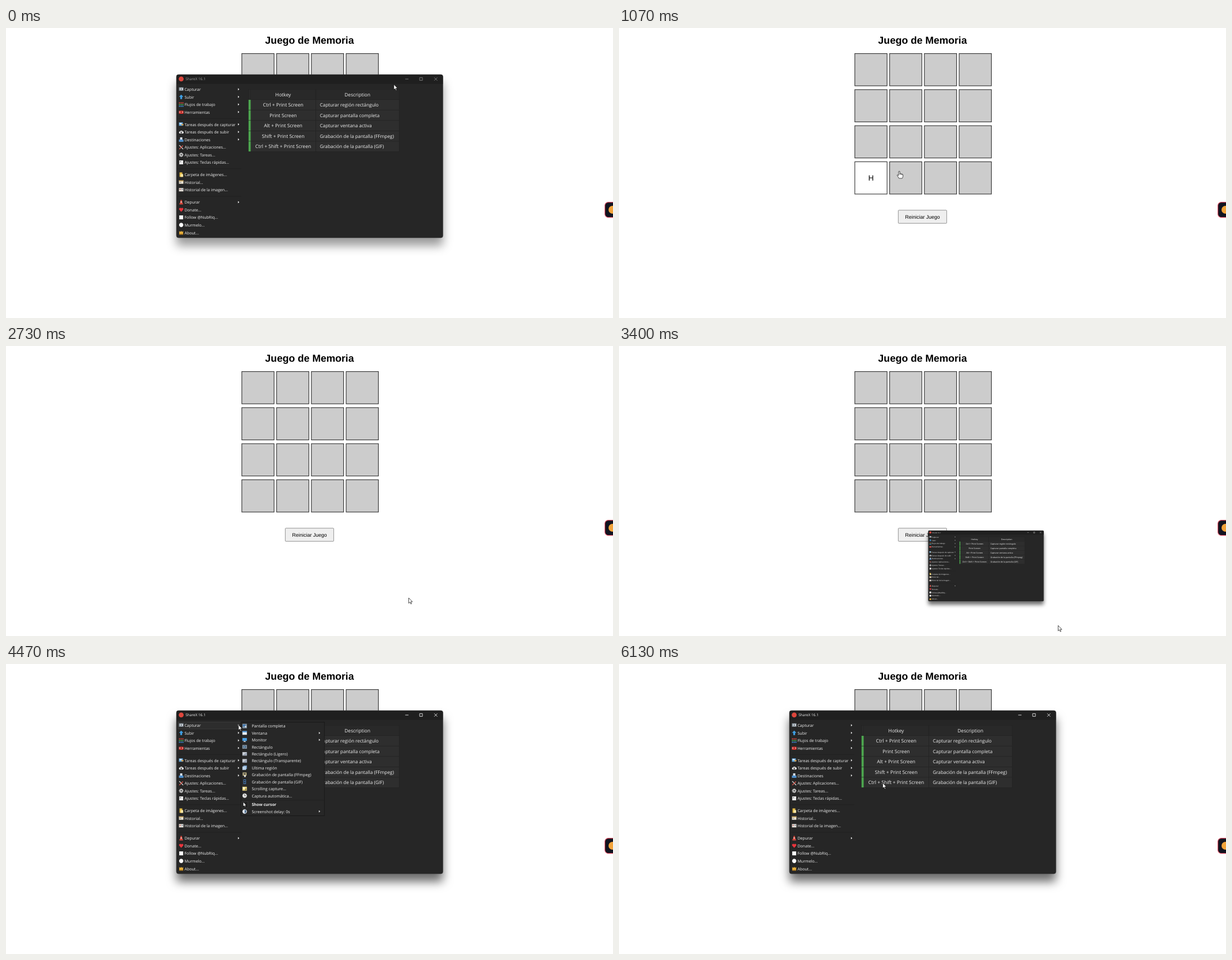
Write an HTML page that moves like this. It is 1083 by 517 pixels and loops after 6.2 s.

```html
<!DOCTYPE html>
<html lang="es">
<head>
<meta charset="utf-8">
<title>Juego de Memoria</title>
<style>
  html, body { margin: 0; width: 100%; height: 100%; overflow: hidden; background: #fff; }
  svg { display: block; width: 1083px; height: 517px; }
  text { font-family: "Open Sans", "Noto Sans", sans-serif; fill: #f0f0f0; text-rendering: geometricPrecision; }
  .page text { font-family: "Liberation Sans", Arial, sans-serif; fill: #000; text-anchor: middle; }
  .mid { text-anchor: middle; }
  .menu { font-size: 7.1px; }
  .sub { font-size: 7.2px; }
  .table { font-size: 8.35px; }
  .table .mid { font-size: 8.6px; }
  .bar text { font-size: 6.5px; }
  .bar path { fill: none; stroke: #fff; stroke-width: .8; }
  .idle .bar text { fill: #a0a0a0; }
  .idle .bar path { stroke: #8c8c8c; }
  .frame { filter: url(#deep); }
  .idle .frame { filter: url(#soft); }
</style>
</head>
<body>
<svg id="stage" viewBox="0 0 1083 517"></svg>
<script>
const FRAMES = 93, LOOP = 6200, STEP = LOOP / FRAMES;
const PX = 1083 / 1920;
const SIDE = 104 * PX, COL = 110 * PX, ROW = 114 * PX, LEFT = 420.2, TOP = 45;

const rect = (x, y, w, h, fill, more = '') =>
  `<rect x="${x}" y="${y}" width="${w}" height="${h}" fill="${fill}" ${more}/>`;
const label = (x, y, s, more = '') => `<text x="${x}" y="${y}" ${more}>${s}</text>`;
const path = (d, fill, more = '') => `<path d="${d}" fill="${fill}" ${more}/>`;
const caret = (x, y) => path(`M${x} ${y - 2}l2.3 2l-2.3 2z`, '#f0f0f0');

// Icons live in an 8 x 8 box: colour, path, colour, path ...
const dots = y => [0, 3, 6].map(x => `M${x} ${y}h2v2h-2z`).join('');
const ICONS = {
  camera: ['#8f9aa3', 'M0 .5h8v6h-8z', '#e4e8ec', 'M2 2h5v3h-5z', '#39434b', 'M3.2 2.7h2v1.6h-2z'],
  up: ['#3f9fe4', 'M4 0L8 4H5.6V8H2.4V4H0z'],
  flow: ['#e2483d', dots(0), '#4caf50', dots(3), '#3f8fe4', dots(6)],
  tools: ['#d8352f', 'M0 1.5h8v5.5h-8z', '#fff', 'M0 3.6h8v.8h-8z', '#8d1915', 'M3 3h2v2h-2z'],
  after: ['#5fa5dc', 'M0 .5h7v6h-7z', '#eef4fa', 'M1 1.6h4v2h-4z', '#f2a53a', 'M4.5 3.6h3.5v2h-3.5z'],
  cloud: ['#e3e3e3', 'M2 7a2 2 0 0 1 0-4a2.5 2.5 0 0 1 4.5 0a2 2 0 0 1 0 4z', '#3c3c3c', 'M4 3l1.7 2h-1v2h-1.4v-2h-1z'],
  drive: ['#5c9dd9', 'M0 4h8v4h-8z', '#dbe6f2', 'M2 0h4v4h-4z', '#2f6ba8', 'M1 5.6h6v1h-6z'],
  wrench: ['#cfcfcf', 'M1 0L8 7l-1 1L0 1z', '#d9564a', 'M0 7L6.5 .5l1 1L1 8z'],
  gear: ['#dcdcdc', 'M3.2 0h1.6v8h-1.6zM0 3.2h8v1.6h-8zM.7 1.8l1.1-1.1l5.5 5.5l-1.1 1.1zM6.2 .7l1.1 1.1l-5.5 5.5l-1.1-1.1z', '#272727', 'M4 2.8a1.2 1.2 0 1 0 .1 0z'],
  keys: ['#ececec', 'M.5 .5h7v7h-7z', '#777', 'M1.7 2h2v1.6h-2z'],
  folder: ['#dfb843', 'M1 0h5v8h-5z', '#f7e6a6', 'M3 3h4.5v5h-4.5z'],
  history: ['#e9e2d2', 'M0 .8h8v6h-8z', '#c59a45', 'M0 .8h8v1.4h-8z', '#777', 'M1 3.6h3v1h-3z'],
  images: ['#e6e1da', 'M0 .8h8v6h-8z', '#b9655c', 'M1 2.4h2.4v1.6h-2.4z', '#71859a', 'M4.6 2.4h2.4v1.6h-2.4z'],
  cone: ['#dc4a3e', 'M3 0h2l1.2 6h1v2h-6.4v-2h1z', '#f3d9d4', 'M2.6 3h2.8l.3 1.4h-3.4z'],
  heart: ['#e8343c', 'M4 7.6L.4 3.8A2.1 2.1 0 0 1 4 1.6A2.1 2.1 0 0 1 7.6 3.8z'],
  square: ['#fff', 'M.5 .5h7v7h-7z'],
  disc: ['#fff', 'M4 .2a3.8 3.8 0 1 0 .1 0z'],
  crown: ['#e9b23c', 'M.5 7.5V1l1.8 2L4 .8L5.7 3L7.5 1v6.5z', '#b67d1c', 'M.5 6h7v1.5h-7z'],
  screen: ['#7f93a5', 'M0 0h8v8h-8z', '#3b76b4', 'M1 1.4h4v3h-4z', '#dce6ee', 'M4.6 4h2.4v2.4h-2.4z'],
  window: ['#e9eef3', 'M0 .6h8v6.6h-8z', '#3f8fd8', 'M0 .6h8v2h-8z'],
  monitor: ['#4aa0e4', 'M0 .5h8v5.2h-8z', '#c4ccd4', 'M3 5.7h2v1h1.2v.9h-4.4v-.9h1.2z'],
  region: ['#8ea0b0', 'M0 .6h8v6.6h-8z', '#31465a', 'M1.6 2h4.8v3.8h-4.8z', '#7fb5e4', 'M2.4 3h3v1.8h-3z'],
  light: ['#c9ced6', 'M0 .8h8v6.2h-8z', '#9aa3b3', 'M0 7l8-6.2v6.2z'],
  layers: ['#7aa4cf', 'M1.8 0h6.2v6.2h-6.2z', '#b8d0e8', 'M0 1.6h6.4v6.2h-6.4z'],
  film: ['#cfc08a', 'M.6 0h6.8v5.5h-6.8z', '#4c4c4c', 'M2 1.2h4v2.6h-4z', '#e5e5e5', 'M3 5h3v3h-3z'],
  gif: ['#4d86c8', 'M1.8 0h4.6v8h-4.6z', '#222', 'M2.6 1h3v2.3h-3zM2.6 4.6h3v2.3h-3z'],
  scroll: ['#e8d27c', 'M0 .5h8v7h-8z', '#fbf6de', 'M1.2 1.6h3v3h-3z', '#7f7340', 'M5 4h2v2.6h-2z'],
  clock: ['#e2e2e2', 'M4 0a4 4 0 1 0 .1 0z', '#444', 'M3.6 1.4h.8v2.4h2v.8h-2.8z'],
  pointer: ['#fff', 'M1.8 .3v6.4l1.6-1.3l1 2.2l.9-.4l-1-2.1h2z'],
  delay: ['#dfe6ee', 'M4 0a4 4 0 1 0 .1 0z', '#4a6a8c', 'M4 1.2a2.8 2.8 0 0 1 0 5.6v-2.8z']
};
function icon(name, x, y) {
  const parts = ICONS[name];
  let out = '';
  for (let i = 0; i < parts.length; i += 2) out += path(parts[i + 1], parts[i]);
  return `<g transform="translate(${x - 4} ${y - 4})">${out}</g>`;
}

// Groups of [icon, text, has submenu]
const MENU = [
  [109.5, ['camera', 'Capturar', 1], ['up', 'Subir', 1], ['flow', 'Flujos de trabajo', 1], ['tools', 'Herramientas', 1]],
  [172, ['after', 'Tareas después de capturar', 1], ['cloud', 'Tareas después de subir', 1], ['drive', 'Destinaciones', 1],
    ['wrench', 'Ajustes: Aplicaciones...'], ['gear', 'Ajustes: Tareas...'], ['keys', 'Ajustes: Teclas rápidas...']],
  [261.6, ['folder', 'Carpeta de imágenes...'], ['history', 'Historial...'], ['images', 'Historial de la imagen...']],
  [310.7, ['cone', 'Depurar', 1], ['heart', 'Donate...'], ['square', 'Follow @NubRiq...'], ['disc', 'Murmelo...'], ['crown', 'About...']]
];
const SUBMENU = [
  [110.8, ['screen', 'Pantalla completa'], ['window', 'Ventana', 1], ['monitor', 'Monitor', 1], ['region', 'Rectángulo'],
    ['light', 'Rectángulo (Ligero)'], ['light', 'Rectángulo (Transparente)'], ['layers', 'Ultima región'],
    ['film', 'Grabación de pantalla (FFmpeg)'], ['gif', 'Grabación de pantalla (GIF)'], ['scroll', 'Scrolling capture...'],
    ['clock', 'Captura automática...']],
  [250.7, ['pointer', 'Show cursor'], ['delay', 'Screenshot delay: 0s', 1]]
];
const HOTKEYS = [
  ['Ctrl + Print Screen', 'Capturar región rectángulo'],
  ['Print Screen', 'Capturar pantalla completa'],
  ['Alt + Print Screen', 'Capturar ventana activa'],
  ['Shift + Print Screen', 'Grabación de la pantalla (FFmpeg)'],
  ['Ctrl + Shift + Print Screen', 'Grabación de la pantalla (GIF)']
];

function list(groups, pitch, iconX, textX, caretX) {
  return groups.map(([y0, ...items]) => items.map(([name, text, more], i) => {
    const y = y0 + i * pitch;
    const bold = name === 'pointer';
    return (bold ? rect(iconX - 5, y - 5.5, 10.5, 11, '#202020', 'stroke="#444" stroke-width=".5"') : '') +
      icon(name, iconX, y - .2) +
      label(textX, y + 2.6, text, bold ? 'font-weight="700"' : '') +
      (more ? caret(caretX, y - .3) : '');
  }).join('')).join('');
}

function page() {
  let out = label(541.5, 28, 'Juego de Memoria', `font-size="${32 * PX}" font-weight="700"`);
  for (let i = 0; i < 16; i++) {
    const x = LEFT + i % 4 * COL, y = TOP + (i >> 2) * ROW;
    out += rect(x + PX, y + PX, SIDE - 2 * PX, SIDE - 2 * PX, '#ccc', `id="card${i}" stroke="#333" stroke-width="${2 * PX}"`);
  }
  const letter = (id, s, c, r) => label(LEFT + c * COL + SIDE / 2, TOP + r * ROW + SIDE / 2 + 4.6, s, `id="${id}" font-size="${24 * PX}"`);
  return out + letter('letterF', 'F', 2, 2) + letter('letterH', 'H', 0, 3) +
    rect(498.3, 324.8, 86.4, 23.4, '#efefef', 'rx="1" stroke="#767676" stroke-width=".8"') +
    label(541.5, 339.6, 'Reiniciar Juego', `font-size="${16 * PX}"`) +
    rect(1068.6, 310.6, 30, 27, '#11131f', 'rx="6" stroke="#d8485c" stroke-width="1.2"') +
    '<circle cx="1082" cy="324" r="7" fill="#f2a33a"/>';
}

function table() {
  let out = rect(432.4, 109, 269.4, 111.6, '#212121') +
    rect(437, 109.5, 115.4, 18, '#292929') + rect(553.2, 109.5, 148.2, 18, '#292929') + rect(432.7, 109.5, 4, 18, '#292929') +
    label(494.5, 121.8, 'Hotkey', 'class="mid"') + label(627, 121.8, 'Description', 'class="mid"');
  HOTKEYS.forEach(([keys, text], i) => {
    const y = 128 + i * 18.55;
    out += rect(432.7, y, 3.9, 17.9, '#4ea64f') + rect(437, y, 115.4, 17.9, '#2e2e2e') + rect(553.2, y, 148.2, 17.9, '#2e2e2e') +
      label(494.5, y + 12.2, keys, 'class="mid"') + label(560, y + 12.2, text);
  });
  return `<g class="table">${out}</g>`;
}

function appWindow() {
  const rule = y => rect(307, y, 113, .8, '#1e1e1e');
  return rect(304, 83, 475.6, 291, '#272727', 'rx="4" class="frame"') +
    path('M304 99.8V87a4 4 0 0 1 4-4H775.6a4 4 0 0 1 4 4V99.8z', '#1f1f1f') +
    rect(304, 83, 475.6, 291, 'none', 'rx="4" stroke="#3a3a3a" stroke-width=".6"') +
    '<g class="bar"><circle cx="312.6" cy="90.8" r="4.4" fill="#dc463c"/>' + label(320.3, 93.3, 'ShareX 16.1') +
    '<path d="M712.3 91h5.8M738 88.4h5v5h-5zM764 88.2l5.6 5.6M769.6 88.2l-5.6 5.6"/></g>' +
    rect(307, 103.5, 113.6, 12.4, '#2d2d2d', 'id="hover" stroke="#454545" stroke-width=".6"') +
    [160.8, 250.5, 299.6].map(rule).join('') +
    `<g class="menu">${list(MENU, 13.55, 312.6, 318.4, 413.9)}</g>` + table() +
    '<g id="sub" class="sub">' + rect(419.3, 103.7, 148.8, 166.8, '#272727', 'stroke="#171717" stroke-width=".9"') +
    rect(421, 242.5, 146, .8, '#1e1e1e') + list(SUBMENU, 12.41, 425.8, 438.4, 558.3) + '</g>';
}

const shadow = (id, alpha) =>
  `<filter id="${id}" x="-10%" y="-10%" width="120%" height="130%"><feDropShadow dx="0" dy="14" stdDeviation="8.5" flood-color="#000" flood-opacity="${alpha}"/></filter>`;
const ink = 'stroke="#000" stroke-width=".7" stroke-linejoin="round"';

document.getElementById('stage').innerHTML =
  `<defs>${shadow('deep', .58)}${shadow('soft', .4)}</defs>` +
  `<g class="page">${page()}</g><g id="app">${appWindow()}</g><g id="cursor">` +
  path('M0 0V9.6L2.2 7.6L3.8 11L5.2 10.4L3.7 7H6.7z', '#fff', `id="arrow" ${ink}`) +
  '<g id="hand">' +
  path('M-1.1 .9Q0-.7 1.1 .9V4.6Q2.4 4 3.2 5Q4.4 4.5 5 5.6Q6.5 5.3 6.6 7V9.5Q6.4 11.5 5.3 13H-.6Q-1.5 11-3.6 8Q-4 6.6-2.6 6.8L-1.1 8.2z', '#fff', ink) +
  path('M1.1 4.6V6.6M3.2 5V6.8M5 5.6V7', 'none', ink) + '</g></g>';

const $ = id => document.getElementById(id);

// [step, x, y]
const TRACK = [
  [0, 692, 100.5], [1, 674, 110], [2, 632, 130], [3, 591.5, 147.3], [5, 581, 172], [9, 578.5, 201.5], [10, 578.5, 201.5],
  [11, 565, 212], [12, 520, 240], [13, 470, 262], [14, 452, 268], [15, 452, 268], [16, 500, 255], [17, 553, 248], [18, 553, 248],
  [19, 558, 240], [21, 574, 212], [22, 576, 208], [24, 574, 215], [26, 558, 240], [28, 549, 254], [29, 546, 256.5], [34, 546, 256.5],
  [36, 558, 275], [38, 605, 330], [40, 680, 410], [42, 757, 488], [43, 790, 545], [50, 800, 545],
  [51, 783.5, 498.3], [53, 647, 408], [55, 500, 270], [57, 430, 175], [60, 411, 129], [64, 414.8, 108.5], [69, 414.8, 108.5],
  [70, 422, 112], [72, 462, 130], [74, 510, 165], [76, 534, 200], [78, 500, 216], [79, 468, 211], [80, 466, 210],
  [83, 426, 219], [85, 445, 216], [87, 470.5, 212], [93, 470.5, 212]
];
// [step, scale, opacity]
const ZOOM = [[0, 1, 1], [1, .9, 1], [2, .5, .6], [3, .4, 0], [50, .4, 0], [51, .433, 1], [52, .88, 1], [53, .993, 1], [54, 1, 1], [93, 1, 1]];

function at(keys, k) {
  const i = Math.max(1, keys.findIndex(p => p[0] >= k));
  const a = keys[i - 1], b = keys[i], u = (k - a[0]) / (b[0] - a[0]);
  return [1, 2].map(j => a[j] + (b[j] - a[j]) * u);
}

const show = (id, on) => $(id).setAttribute('visibility', on ? 'visible' : 'hidden');

function flip(card, letter, on) {
  $(card).setAttribute('fill', on ? '#fff' : '#ccc');
  show(letter, on);
}

function overCard(x, y) {
  const u = x - LEFT, v = y - TOP;
  return u >= 0 && v >= 0 && u < 4 * COL && v < 4 * ROW && u % COL < SIDE && v % ROW < SIDE;
}

function draw(k) {
  const [x, y] = at(TRACK, k), [scale, alpha] = at(ZOOM, k);
  const app = $('app');
  app.setAttribute('transform', `translate(741 517) scale(${scale}) translate(-741 -517)`);
  app.setAttribute('opacity', alpha);
  app.setAttribute('display', alpha ? 'inline' : 'none');
  app.setAttribute('class', k < 51 ? 'idle' : '');

  flip('card10', 'letterF', k >= 21 && k < 36);
  flip('card12', 'letterH', k >= 15 && k < 36);

  const open = k >= 67 && k < 92;
  const row = open ? 0 : Math.floor((y - 103) / 13.55);
  const hover = open || (k > 53 && x > 307 && x < 421 && row >= 0 && row < 4);
  $('hover').setAttribute('y', 103.5 + row * 13.55);
  $('hover').setAttribute('display', hover ? 'inline' : 'none');
  $('sub').setAttribute('display', open ? 'inline' : 'none');

  const hand = k > 1 && k < 51 && overCard(x, y);
  show('hand', hand);
  show('arrow', !hand);
  $('cursor').setAttribute('transform', `translate(${x} ${y})`);
}

let last = -1;
function tick() {
  const k = Math.floor((performance.now() % LOOP + 3.4) / STEP) % FRAMES;
  if (k !== last) draw(last = k);
  requestAnimationFrame(tick);
}
tick();
</script>
</body>
</html>
```
